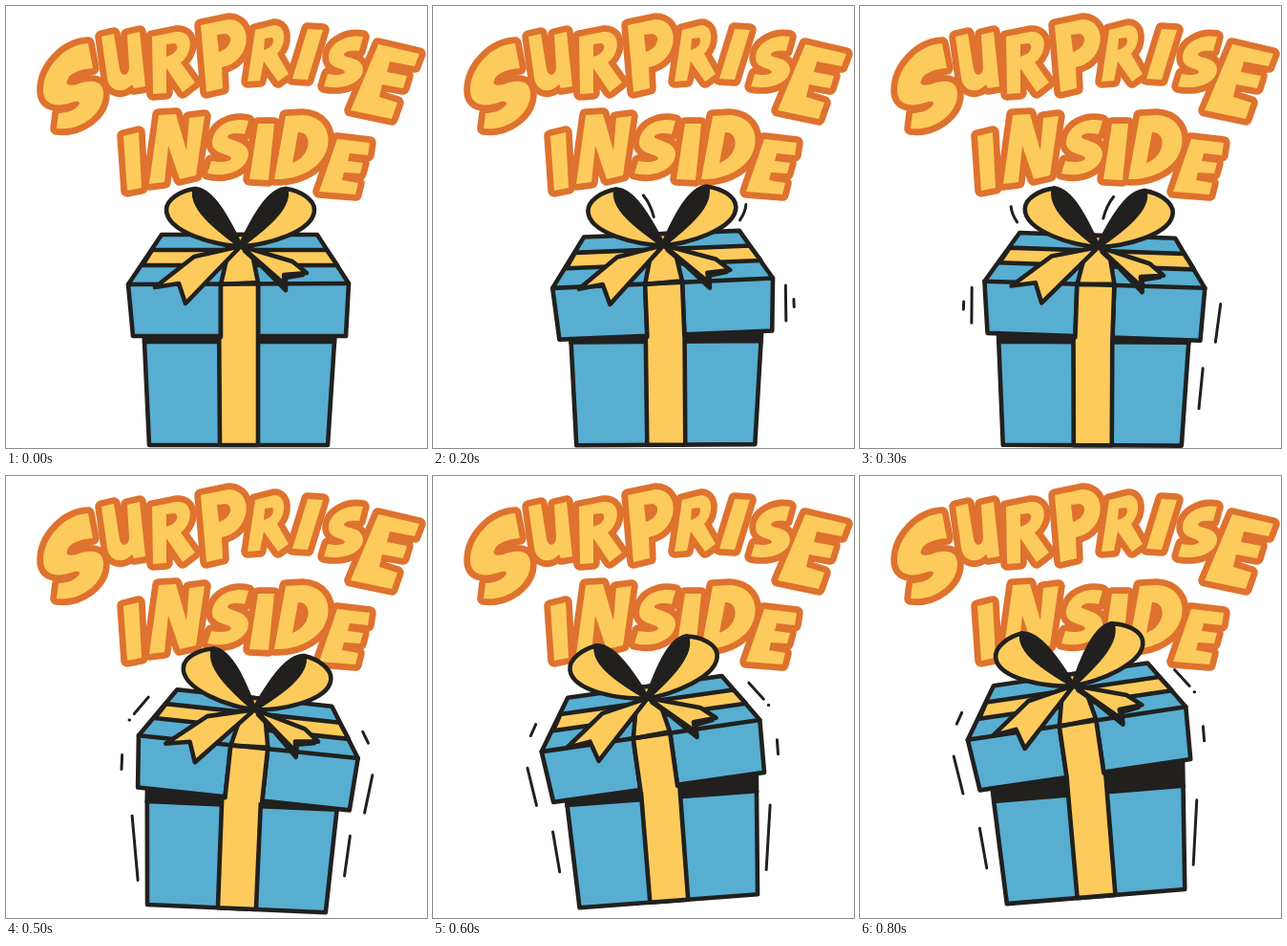
Recreate the animation shown at these times as an HTML page. Size 441 px wide and 462 px high, loop 0.9 s.

```html
<!DOCTYPE html>
<html lang="en">
<head>
<meta charset="utf-8">
<title>Surprise inside</title>
<style>
  html, body { margin: 0; width: 100%; height: 100%; overflow: hidden; background: #fff; }
  svg { display: block; width: 441px; height: 462px; }
  #words path { fill-rule: evenodd; stroke-linejoin: round; }
  .edge { fill: #de722e; stroke: #de722e; stroke-width: 13.5; }
  .face { fill: #fdcb5b; }
  .gift { stroke: #21201e; stroke-width: 4.6; stroke-linejoin: round; stroke-linecap: round; }
  .blue { fill: #57aed1; }
  .gold { fill: #fdcb5b; }
  .dark { fill: #21201e; }
  .line { fill: none; }
  .bare { stroke: none; }
  .marks { fill: none; stroke-width: 3; }
</style>
</head>
<body>
<svg viewBox="0 0 441 462" role="img" aria-label="Surprise inside">
  <defs>
    <g id="words">
      <path d="M86 39C62 40 39 64 39 88C39 104 54 106 68 101C77 98 79 101 75 105C70 110 62 112 55 112L53 128C78 131 102 113 102 92C102 78 90 76 74 82C66 84 62 82 64 78C66 70 78 66 91 65Z"/>
      <path d="M100 32L113 29L119 66C121 75 129 73 129 64L127 30L140 27L146 84L134 86L132 82C122 93 108 89 106 75Z"/>
      <path d="M153 32L178 27C198 25 196 50 183 59L198 80L185 90L168 65L168 91L154 92ZM168 40L176 39C182 40 180 50 168 53Z"/>
      <path d="M204 20L233 14C260 14 258 58 226 64L227 86L210 90ZM221 30L230 29C239 31 236 44 223 48Z"/>
      <path d="M261 25L281 20C294 20 294 40 284 50L296 71L285 79L270 58L266 78L253 79ZM271 34L279 33C282 38 278 44 270 46Z"/>
      <path d="M316 24L332 25L316 77L300 76Z"/>
      <path d="M374 32L370 47C362 46 354 47 354 51C355 55 373 53 374 66C374 80 354 88 333 84L337 71C346 73 354 72 355 69C354 64 338 66 338 54C338 38 358 29 374 32Z"/>
      <path d="M390 40L433 50L428 63L402 58L399 69L420 73L416 86L394 82L391 95L410 101L404 118L361 109Z"/>
      <path d="M123 136L139 132L142 190L127 193Z"/>
      <path d="M160 114L178 113L189 151L192 117L208 115L199 177L182 181L170 146L166 184L150 186Z"/>
      <path d="M254 120L250 134C242 132 232 133 232 137C234 141 253 141 254 154C254 170 233 180 211 175L215 162C225 164 235 163 236 159C234 154 216 155 216 143C217 125 236 116 254 120Z"/>
      <path d="M264 123L281 123L275 182L255 181Z"/>
      <path d="M293 115L311 114C331 115 340 130 337 146C333 168 308 182 281 181ZM306 132C322 132 320 157 300 164Z"/>
      <path d="M347 139L381 143L379 156L360 154L358 162L374 164L371 175L354 174L352 182L369 185L366 197L328 194Z"/>
    </g>
    <g id="loop">
      <path class="gold" d="M246 251C220 251 168 236 168 213C168 202 183 193 198 191C194 210 220 232 246 251Z"/>
      <path class="dark" d="M198 191C216 192 232 222 246 251C220 232 192 210 198 191Z"/>
    </g>
  </defs>

  <use href="#words" class="edge"/>
  <use href="#words" class="face"/>

  <g class="gift">
    <g id="body">
      <path class="dark" d="M144 320H346L344 352H145Z"/>
      <path class="blue" d="M145 351H344L337 459H150Z"/>
      <path class="gold bare" d="M223 318H264V459H224Z"/>
      <path class="line" d="M223 318L224 459H264V318"/>
      <g class="marks">
        <path class="side" d="M128 378L132 420"/>
        <path class="far" d="M357 367L348 434"/>
      </g>
    </g>
    <g id="lid">
      <path class="blue" d="M163 239H326L359 290L356 345H264V290H225V345H133L128 291Z"/>
      <path class="gold" d="M153 255H336L347 271H143Z"/>
      <path class="gold bare" d="M225 290H264V347H225Z"/>
      <path class="line" d="M225 290V346M264 290V346"/>
      <path class="gold" d="M237 239H254L264 289L225 291Z"/>
      <path class="line" d="M128 291L359 290"/>
      <g id="bow">
        <path class="dark" d="M250 256L266 270L293 297L293 284L311 281Z"/>
        <path class="gold" d="M246 251L300 267L315 279L291 281L292 291Z"/>
        <path class="gold" d="M246 251L197 262L156 294L181 290L188 311L215 283Z"/>
        <use href="#loop"/>
        <use href="#loop" transform="matrix(-1 0 0 1 491 0)"/>
      </g>
      <g class="marks">
        <path class="near" d="M227 198Q234 207 237 221M334 212Q333 220 327 228M372 298L371 335M380 313V321"/>
        <path class="side" d="M111 306L115 346"/>
        <path class="far" d="M126 262L119 273M353 250L366 269M370 276H370.5M374 313L373 328"/>
      </g>
    </g>
  </g>
</svg>
<script>
  const STEP = 100;
  const BEATS = 9;
  const HOP = 5; // first beat off the ground

  const [body, lid, bow] = ['body', 'lid', 'bow'].map(id => document.getElementById(id));
  const place = (part, transform) => part.setAttribute('transform', transform);

  function show(kind, visible) {
    for (const mark of document.querySelectorAll('.' + kind)) {
      mark.setAttribute('visibility', visible ? 'visible' : 'hidden');
    }
  }

  // The box rocks to alternate sides, then hops higher with each beat.
  function pose(beat) {
    const hopping = beat >= HOP;
    const side = beat % 2 ? 1 : -1;
    const swing = hopping ? 7 : Math.min(beat, 2.5);
    const tilt = side * swing - beat / 6;
    const bodyTilt = tilt * Math.abs(tilt) / 15;
    const air = beat - HOP;
    const bodyLift = hopping ? 9 + 2.2 * air : 0;
    const lidLift = hopping ? 10 + 6.5 * air : 0;

    place(body, `translate(${-0.8 * bodyTilt} ${-bodyLift}) rotate(${bodyTilt} 196 459)`);
    place(lid, `translate(${1.8 * bodyTilt} ${-lidLift}) rotate(${tilt} 222 345)`);
    place(bow, `rotate(${-tilt / 4} 246 251)`);

    for (const group of document.querySelectorAll('.marks')) {
      place(group, side > 0 ? 'matrix(-1 0 0 1 487 0)' : '');
    }
    show('near', beat > 0 && !hopping);
    show('side', beat > 2);
    show('far', hopping);
  }

  let shown = -1;
  function draw() {
    const beat = Math.floor(performance.now() / STEP) % BEATS;
    if (beat !== shown) pose(shown = beat);
    requestAnimationFrame(draw);
  }
  draw();
</script>
</body>
</html>
```
